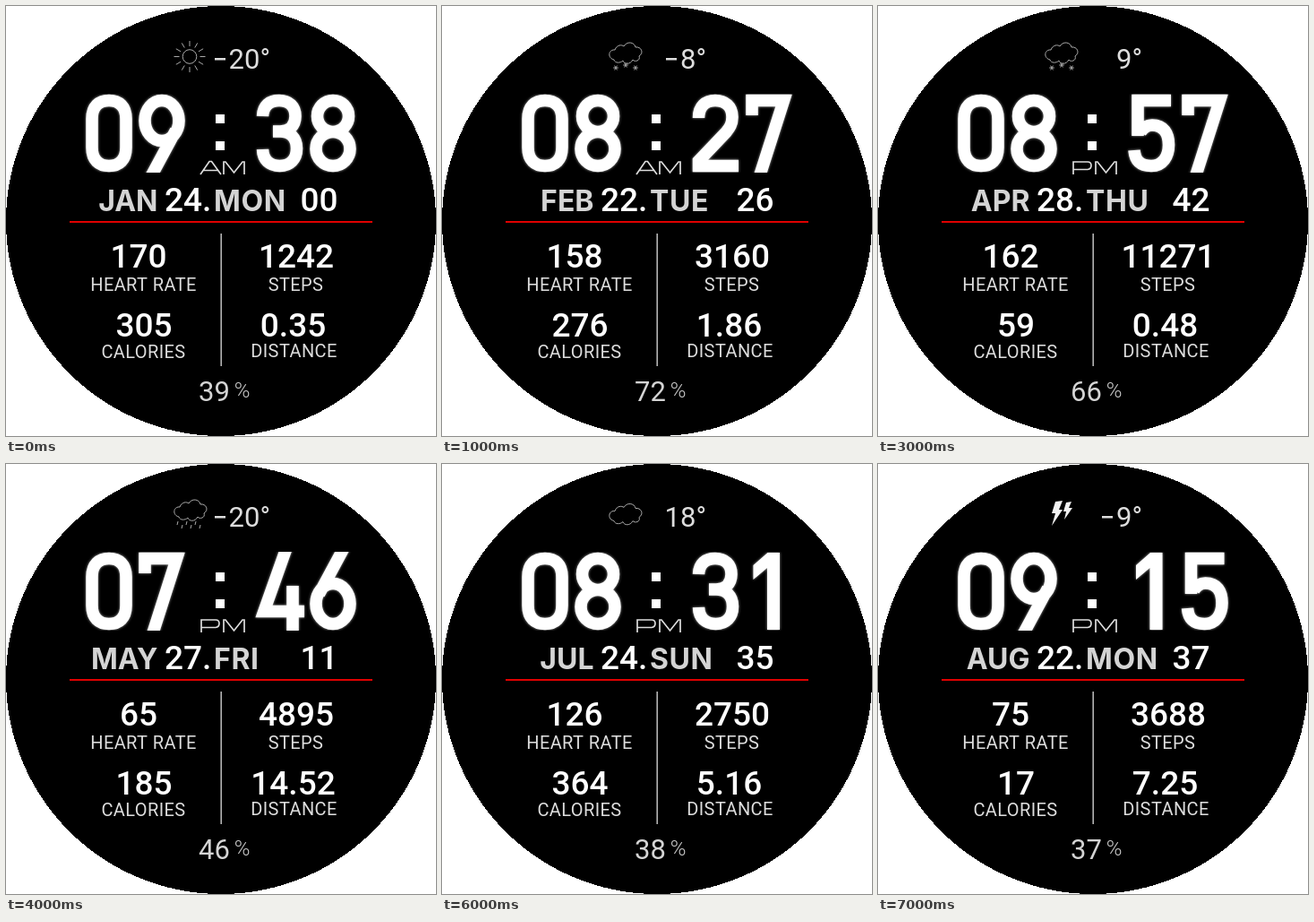
An HTML page with a canvas that plays this animation: 480x480 px, repeating every 8 s.

```html
<!DOCTYPE html>
<html lang="en">
<head>
<meta charset="utf-8">
<title>Watch face</title>
<style>
html, body { margin: 0; width: 100%; height: 100%; overflow: hidden; background: #fff; }
canvas { display: block; }
</style>
</head>
<body>
<canvas id="face" width="480" height="480"></canvas>
<script>
const ctx = document.getElementById('face').getContext('2d');
const STEP = 1000;

// icon, temperature, time, half, month, day, weekday, seconds, heart, steps, calories, distance, battery
const states = [
  'sun -20 0938 AM JAN 24 MON 00 170 1242 305 0.35 39',
  'snow -8 0827 AM FEB 22 TUE 26 158 3160 276 1.86 72',
  'cloud -1 1005 AM MAR 16 WED 17 163 2349 257 2.94 57',
  'snow 9 0857 PM APR 28 THU 42 162 11271 59 0.48 66',
  'rain -20 0746 PM MAY 27 FRI 11 65 4895 185 14.52 46',
  'sun 27 0652 AM JUN 25 SAT 39 168 429 438 2.99 13',
  'cloud 18 0831 PM JUL 24 SUN 35 126 2750 364 5.16 38',
  'bolt -9 0915 PM AUG 22 MON 37 75 3688 17 7.25 37'
].map(row => row.split(' '));

// Digit centre lines in a 53 x 88 box; the 1 is a filled outline.
const bowl = 'M7.5 58A19 22.5 0 1 1 45.5 58A19 22.5 0 1 1 7.5 58Z';
const digits = [
  'M7.5 28C7.5 14 15 7.5 26.5 7.5S45.5 14 45.5 28V60C45.5 74 38 80.5 26.5 80.5S7.5 74 7.5 60Z',
  'M38.5 1V87H24.5V18L9 31V15L25 1Z',
  'M7.5 27C7.5 14 15 7.5 26 7.5S45 14 45 26C45 34 42 38 38 43L7.5 75V80.5H52',
  'M7.5 25C8 13 15 7.5 26 7.5S44 14 44 25S37 42 27 42H19M27 42C38 42 45.5 49 45.5 61S38 80.5 26.5 80.5S8 74 7.5 62',
  'M34 -4L9 66.5H54M41 38V88',
  'M48 7.5H11V47M14 43C17 38 21 35 27 35C40 35 45.5 44 45.5 57S39 80.5 26 80.5S8 74 7 63',
  bowl + 'M39 -5L11 47',
  'M7.5 24V7.5H43L16 92',
  'M9 25A17.5 17.5 0 1 1 44 25A17.5 17.5 0 1 1 9 25ZM7.5 61.5A19 19 0 1 1 45.5 61.5A19 19 0 1 1 7.5 61.5Z',
  bowl + 'M39 -5L11 47'
].map(d => new Path2D(d));

const halfLetters = {
  A: new Path2D('M217 188L227 173.5H229.5L240 188M220.5 183.5H236.5'),
  P: new Path2D('M218 188V174H234Q238 174 238 178T234 182.5H218'),
  M: new Path2D('M243 188V174H245L254.5 186L264 174H266V188')
};
const cloud = new Path2D('M6 20C-2 18 0 8 7 9C9 3 15 3 17 5C20 -1 29 0 30 6C36 5 40 12 34 16C36 21 29 23 27 20C24 26 17 25 16 21C13 24 7 24 6 20Z');
const bolts = new Path2D('M198 42L206 41L202 51H206L194 69L198 55H194ZM210 43L216 42L213 49H217L208 62L210 53H207Z');

function text(str, x, y, font, color = '#fff', align = 'center', spacing = 0) {
  ctx.font = font;
  ctx.fillStyle = color;
  ctx.textAlign = align;
  ctx.letterSpacing = spacing + 'px';
  ctx.fillText(str, x, y);
}

function line(x1, y1, x2, y2) {
  ctx.beginPath();
  ctx.moveTo(x1, y1);
  ctx.lineTo(x2, y2);
  ctx.stroke();
}

// Hard-edged disc, one row at a time.
function disc(radius) {
  ctx.fillStyle = '#000';
  for (let y = 0; y < 2 * radius; y++) {
    const half = Math.round(Math.sqrt(radius ** 2 - (y + 0.5 - radius) ** 2));
    ctx.fillRect(radius - half, y, 2 * half, 1);
  }
}

function bigDigit(n, x) {
  ctx.save();
  ctx.translate(x, 98);
  ctx.beginPath();
  ctx.rect(-4, 0, 62, 88);
  ctx.clip();
  if (n === 9) {
    ctx.translate(53, 88);
    ctx.rotate(Math.PI);
  }
  ctx.fillStyle = ctx.strokeStyle = '#fff';
  ctx.shadowColor = '#aaa';
  ctx.shadowBlur = 3;
  ctx.lineWidth = 13.5;
  if (n === 1) ctx.fill(digits[n]);
  else ctx.stroke(digits[n]);
  ctx.restore();
}

function drawCloud(x, y) {
  ctx.save();
  ctx.translate(x, y);
  ctx.stroke(cloud);
  ctx.restore();
}

function spokes(x, y, count, from, to) {
  for (let i = 0; i < count; i++) {
    const a = i * 2 * Math.PI / count;
    const c = Math.cos(a), s = Math.sin(a);
    line(x + c * from, y + s * from, x + c * to, y + s * to);
  }
}

const icons = {
  sun() {
    ctx.beginPath();
    ctx.arc(205, 56.5, 7.8, 0, 2 * Math.PI);
    ctx.stroke();
    spokes(205, 56.5, 12, 11.5, 17.5);
  },
  cloud() { drawCloud(186, 43.5); },
  snow() {
    drawCloud(186, 40);
    for (const [x, y] of [[194, 69], [205, 66], [216, 69]]) spokes(x, y, 6, 0, 2.8);
  },
  rain() {
    drawCloud(187, 39);
    for (let i = 0; i < 6; i++) {
      const x = 192 + i * 5, y = 64 + (i % 2) * 4;
      line(x, y, x - 1, y + 4);
    }
  },
  bolt() {
    ctx.fillStyle = '#f2f2f2';
    ctx.fill(bolts);
  }
};

function draw(state) {
  const [icon, temp, time, half, month, day, weekday, seconds,
    heart, steps, calories, distance, battery] = state;
  const number = '500 37px Roboto, sans-serif';
  const dateName = '700 32px Inter, sans-serif';
  const light = '400 31px Roboto, sans-serif';
  const label = (str, x, y) => text(str, x, y, '400 20px Roboto, sans-serif', '#ddd', 'center', 0.4);

  ctx.fillStyle = '#fff';
  ctx.fillRect(0, 0, 480, 480);
  disc(240);

  ctx.strokeStyle = '#aaa';
  ctx.lineWidth = 1;
  icons[icon]();

  const degrees = temp.replace('-', '');
  text(degrees + '°', 295, 69.5, light, '#ddd', 'right');
  if (temp[0] === '-') ctx.fillRect(degrees.length > 1 ? 233 : 250, 58, 12, 2.5);

  [88.5, 147.5, 279, 338.5].forEach((x, i) => bigDigit(+time[i], x));
  ctx.fillStyle = '#fff';
  ctx.fillRect(234, 121, 10, 10);
  ctx.fillRect(234, 151, 10, 10);
  ctx.strokeStyle = '#ddd';
  ctx.lineWidth = 1.7;
  for (const letter of half) ctx.stroke(halfLetters[letter]);

  text(month, 169.5, 228.5, dateName, '#d4d4d4', 'right');
  text(day + '.', 177, 229, number, '#fff', 'left');
  text(weekday, 232, 228.5, dateName, '#d4d4d4', 'left', 0.6);
  text(seconds, 349.5, 229, number);

  ctx.fillStyle = '#e00000';
  ctx.fillRect(71, 240, 338, 2);
  ctx.fillStyle = '#b4b4b4';
  ctx.fillRect(239.4, 254, 1.6, 148);

  text(heart, 148, 291.5, number);
  text(steps, 324, 291.5, number);
  text(calories, 154, 369, number);
  text(distance, 320.5, 369, number);
  label('HEART RATE', 153.5, 317.5);
  label('STEPS', 323.5, 317.5);
  label('CALORIES', 153.5, 392.5);
  label('DISTANCE', 321.5, 392);

  text(battery, 232.5, 440.5, light, '#d4d4d4');
  text('%', 263.5, 437, '300 24px Roboto, sans-serif', '#ccc');
}

function tick() {
  draw(states[Math.floor(performance.now() / STEP) % states.length]);
  requestAnimationFrame(tick);
}
tick();
</script>
</body>
</html>
```
